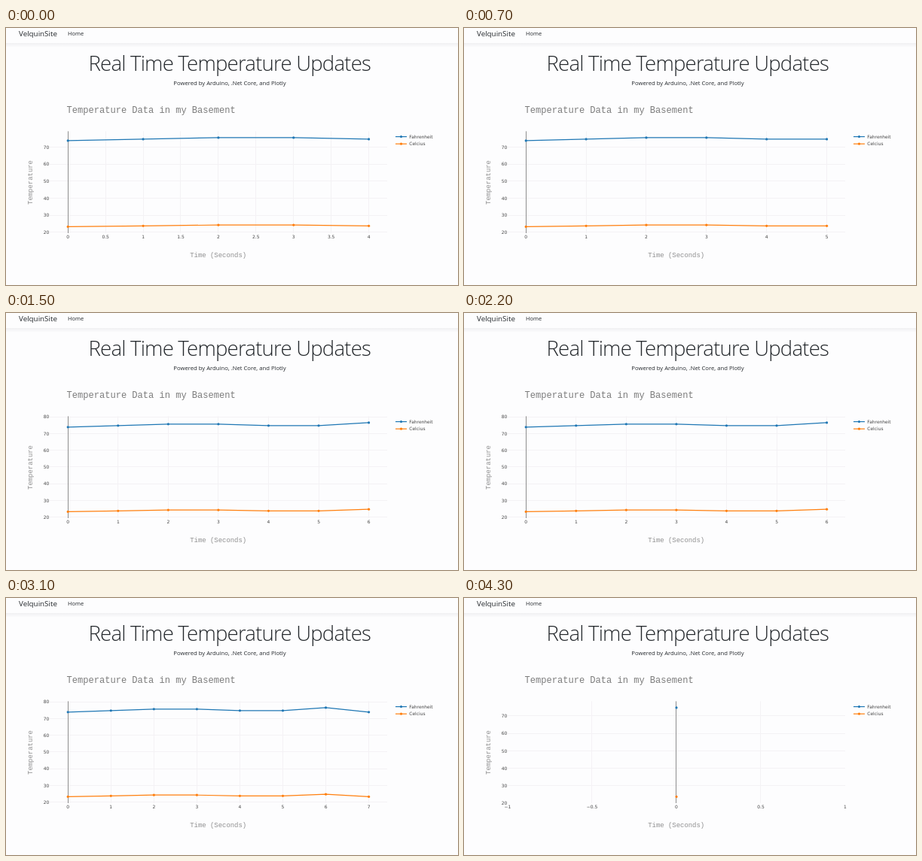
Write an HTML page that moves like this. It is 600 by 342 pixels and loops after 5000 ms.

```html
<!DOCTYPE html>
<html lang="en">
<head>
<meta charset="utf-8">
<title>Real Time Temperature Updates</title>
<style>
  html, body { margin: 0; width: 100%; height: 100%; overflow: hidden; background: #fdfdfe; }
  svg { display: block; width: 100vw; height: 100vh; }
  .ui { font-family: "Open Sans", "Noto Sans", sans-serif; fill: #24282c; }
  .head { font-size: 27.6px; font-weight: 300; letter-spacing: -.029em; }
  .mono { font-family: "Liberation Mono", monospace; fill: #7c7c7c; }
  .tick { font: 5.95px "DejaVu Sans", sans-serif; fill: #444; }
  .mid { text-anchor: middle; }
  .end { text-anchor: end; }
  .grid { stroke: #f4f2f5; }
  .zero { stroke: #8e8e8e; }
</style>
</head>
<body>
<svg viewBox="0 0 600 342">
  <defs>
    <linearGradient id="shade" x2="0" y2="1">
      <stop offset="0" stop-color="#f0f0f2"/>
      <stop offset="1" stop-color="#fdfdfe"/>
    </linearGradient>
  </defs>
  <rect y="20" width="600" height="6" fill="url(#shade)"/>
  <g class="ui">
    <text x="17" y="10.5" font-size="9.8">VelquinSite</text>
    <text x="82" y="9.8" font-size="7.5">Home</text>
    <text class="head mid" x="296.8" y="57.2">Real Time Temperature Updates</text>
    <text class="mid" x="297" y="76" font-size="7.7">Powered by Arduino, .Net Core, and Plotly</text>
  </g>
  <g class="mono">
    <text id="title" y="112.5" font-size="12.05">Temperature Data in my Basement</text>
    <text id="xTitle" class="mid" y="305.3" font-size="8.93" fill-opacity=".85">Time (Seconds)</text>
    <text class="mid" transform="translate(34.8 205.5) rotate(-90)" font-size="8.93" fill-opacity=".85">Temperature</text>
  </g>
  <g id="chart"></g>
</svg>
<script>
const LOOP = 5000;
const LEFT = 58, TOP = 137.4, BOTTOM = 273;
const BLUE = '#1f77b4', ORANGE = '#ff7f0e';
const CELSIUS = [23.24, 23.73, 24.22, 24.22, 23.73, 23.73, 24.71, 23.24];
const toF = c => c * 1.8 + 32;

// Start time of each state and the readings it plots
const STATES = [
  [0, CELSIUS.slice(0, 5)],
  [100, CELSIUS.slice(0, 6)],
  [1400, CELSIUS.slice(0, 7)],
  [2400, CELSIUS],
  [3200, []],
  [4300, [23.73]]
];

const byId = id => document.getElementById(id);
const crisp = v => Math.ceil(v) - 0.5;
const label = v => String(v).replace('-', '\u2212');

function ticks(lo, hi, step) {
  const list = [];
  for (let v = Math.ceil(lo / step) * step; v <= hi + 1e-6; v += step) list.push(v);
  return list;
}

// Axis ranges padded around the data, as pixel mappings
function axes(data) {
  const n = data.length;
  const right = n ? 506 : 536;
  if (!n) {
    return {
      right,
      x: v => LEFT + (v + 1) * (right - LEFT) / 7,
      y: v => BOTTOM - (v + 1) * (BOTTOM - TOP) / 5,
      xTicks: ticks(-1, 6, 1),
      yTicks: ticks(-1, 4, 1)
    };
  }
  const low = Math.min(...data), high = toF(Math.max(...data));
  const scale = 118.5 / (high - low);
  return {
    right,
    x: n > 1 ? v => 82.2 + v * 399.4 / (n - 1) : v => 282 + v * 224,
    y: v => 264.4 - (v - low) * scale,
    xTicks: n > 1 ? ticks(0, n - 1, n > 5 ? 1 : 0.5) : ticks(-1, 1, 0.5),
    yTicks: ticks(20, high + 8 / scale, 10)
  };
}

const line = (x1, y1, x2, y2, kind) =>
  `<line class="${kind}" x1="${x1}" y1="${y1}" x2="${x2}" y2="${y2}"/>`;
const text = (x, y, s, kind = '') => `<text class="tick ${kind}" x="${x}" y="${y}">${s}</text>`;

function trace(points, color) {
  const path = points.map(p => p.join()).join(' ');
  const dots = points.map(([x, y]) => `<circle cx="${x}" cy="${y}" r="1.6"/>`).join('');
  return `<g fill="${color}"><polyline points="${path}" fill="none" stroke="${color}" stroke-width="1.2"/>${dots}</g>`;
}

function legend(y, name, color) {
  return `<path d="M517 ${y}h15" stroke="${color}" stroke-width="1.2"/>` +
    `<circle cx="524.5" cy="${y}" r="1.6" fill="${color}"/>` + text(535.3, y + 2.2, name);
}

function draw(data) {
  const { right, x, y, xTicks, yTicks } = axes(data);
  const vert = (v, kind) => line(crisp(x(v)), TOP, crisp(x(v)), BOTTOM, kind);
  const horiz = (v, kind) => line(LEFT, crisp(y(v)), right, crisp(y(v)), kind);
  let out = '';
  for (const v of xTicks) {
    if (v && x(v) > LEFT + 1 && x(v) < right - 1) out += vert(v, 'grid');
    out += text(x(v), 279.7, label(v), 'mid');
  }
  for (const v of yTicks) {
    if (v && y(v) > TOP + 0.4 && y(v) < BOTTOM - 0.4) out += horiz(v, 'grid');
    out += text(57.4, y(v) + 2.2, label(v), 'end');
  }
  out += vert(0, 'zero');
  if (data.length) {
    out += trace(data.map((c, i) => [x(i), y(toF(c))]), BLUE);
    out += trace(data.map((c, i) => [x(i), y(c)]), ORANGE);
    out += legend(144.6, 'Fahrenheit', BLUE) + legend(154.2, 'Celcius', ORANGE);
  } else {
    out += horiz(0, 'zero');
  }
  byId('chart').innerHTML = out;
  byId('title').setAttribute('x', data.length ? 80.6 : 82);
  byId('xTitle').setAttribute('x', (LEFT + right) / 2 - 0.3);
}

let shown;
function frame(now) {
  const t = now % LOOP;
  const state = STATES.filter(([start]) => start <= t).pop();
  if (state !== shown) draw((shown = state)[1]);
  requestAnimationFrame(frame);
}
frame(0);
</script>
</body>
</html>
```
